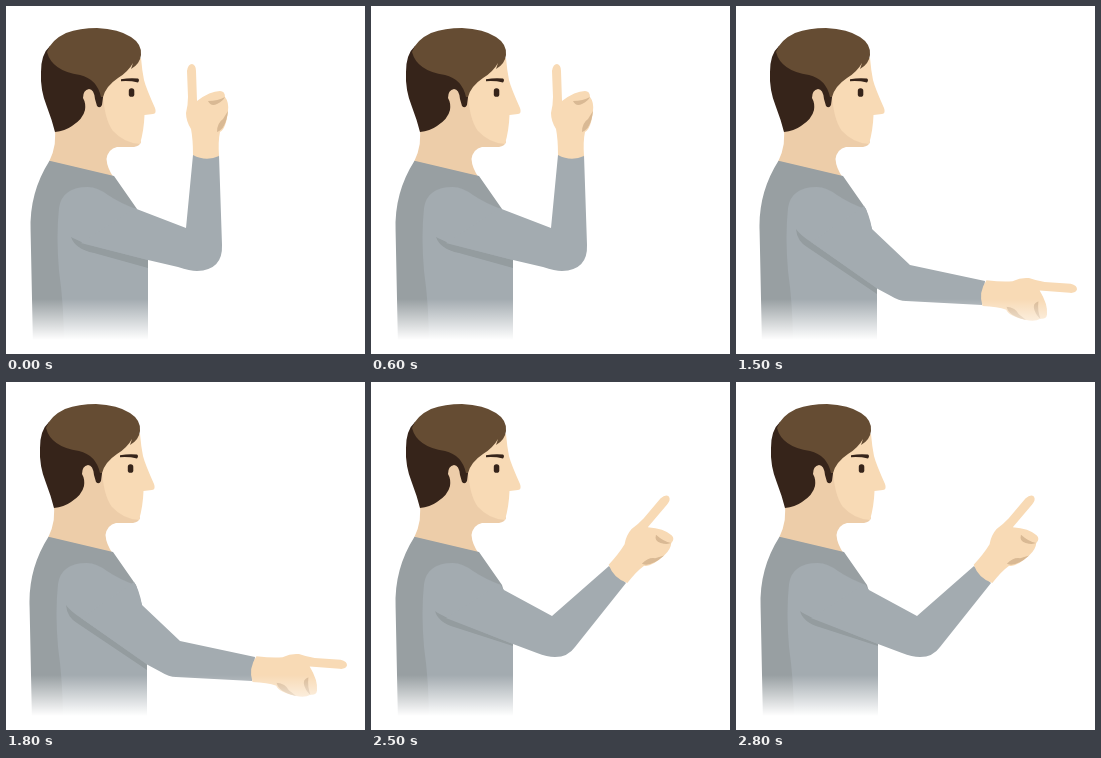
Animation of 359 by 348 pixels, one loop 3000 ms. Source, as an HTML page:

```html
<!DOCTYPE html>
<html lang="en">
<head>
<meta charset="utf-8">
<title>Pointing man</title>
<style>
  html, body { margin: 0; width: 100%; height: 100%; overflow: hidden; background: #fff; }
  svg { display: block; width: 100%; height: 100%; }
  .hair { fill: #36241a; }
  .top { fill: #654c33; }
  .skin { fill: #edcda9; }
  .light { fill: #f8dab5; }
  .tan { fill: #d9b994; }
  .back { fill: #989fa2; }
  .shirt { fill: #a3abb0; }
  #shade { fill: #949c9f; }
</style>
</head>
<body>
<svg viewBox="0 0 359 348">
  <defs>
    <linearGradient id="mist" x1="0" y1="0" x2="0" y2="1">
      <stop offset="0" stop-color="#fff" stop-opacity="0"/>
      <stop offset="1" stop-color="#fff"/>
    </linearGradient>
  </defs>
  <g id="man">
    <!-- neck, face -->
    <path class="skin" d="M48 118Q52 138 43 156L108 172Q101 162 100.5 153Q102 143 111 141L128 141Q134 140 135 136L110 80H60Z"/>
    <path class="light" d="M97 86Q98 70 110 65L135 52Q136 64 138 74Q140 82 149 102Q151 107.5 147 108L138.5 109Q138 124 134 138Q118 137 107 125Q98 113 97 86Z"/>
    <!-- hair around the ear, fringe -->
    <path class="hair" d="M49 126Q46 114 41 101Q34 84 35 66Q35 48 44 40L95 72Q99 82 96 99Q94 103 91 100L89 93Q88 83 83 83Q77 84 77 92Q80 97 79 104Q77 113 66 120Q59 125 49 126Z"/>
    <path class="top" d="M41 46Q45 34 60 27Q74 22 91 22Q113 23 125 31Q136 38 135 49Q134 58 125 63L127 57Q122 66 112 72Q100 80 97 91L95 91Q91 73 74 69Q46 65 41 46Z"/>
    <!-- brow, eye -->
    <path class="hair" d="M115 73.2Q124 71.5 132 72.5Q134 74 132 76.5Q124 74.5 115 75.2Z"/>
    <rect class="hair" x="122.8" y="82.2" width="5.5" height="8.6" rx="2.6"/>
    <!-- sweater -->
    <path class="back" d="M43.5 154.7L108 170L131 203L142 240V340H27L24.6 225Q23 187 43.5 154.7Z"/>
    <path class="shirt" d="M58 340Q58 300 53 265Q50 230 53 202Q56 181 82 181Q91 181 102 189Q114 197 130 203L142 240V340Z"/>
    <path id="shade"/>
  </g>
  <path id="arm" class="shirt"/>
  <g id="hand">
    <!-- origin at the wrist, finger upwards -->
    <path class="light" d="M-13 -2Q-13 -18 -15 -28Q-20 -36 -20 -44Q-18 -52 -18 -60L-19 -86Q-18 -93 -14 -93Q-10 -92 -10 -86L-9 -56Q4 -66 14 -66Q19 -66 19 -60Q23 -55 22 -46Q20 -28 14 -25Q12 -16 13 -1Q0 5 -13 -2Z"/>
    <path class="tan" d="M2 -56Q12 -56 19 -60Q17 -56 11 -53Q5 -50 2 -56ZM22 -46Q20 -28 11 -25Q11 -34 17 -38Z"/>
  </g>
  <rect y="293" width="359" height="41" fill="url(#mist)"/>
  <rect y="333.5" width="359" height="15" fill="#fff"/>
</svg>
<script>
  const el = id => document.getElementById(id);
  const poses = [
    { arm: "M128 202L180 222L187 149L213 149L216 239Q217 264 191 265Q184 265 172 261L142 254L75 237Z",
      shade: "M65 231Q69 233 80 238L142 254V262L88 247Q69 243 65 231Z",
      hand: [200, 151, 0], dx: 0 },
    { arm: "M128 200Q135 208 138 233L168 269Q171 274 175 277L233 319L218 338L155 305L142 297L75 237Z",
      shade: "M59 220Q64 227 75 237L142 297V302L70 241Q59 232 59 220Z",
      hand: [226, 329, 122], dx: -.4 },
    { arm: "M128 200Q133 207 136 223L174 259L249 275L246 299L170 295Q163 295 155 290L141 282.5L75 236Z",
      shade: "M61 223Q65 229 76 236L142 282V288L72 241Q62 235 61 223Z",
      hand: [247, 287, 96.5], dx: -1 },
    { arm: "M128 200Q133 207 135 215L179 246L254 227L261 251L185 285Q178 289 171 285L142 273L75 236Z",
      shade: "M63 227Q67 231 78 237L142 272V279L78 243Q65 238 63 227Z",
      hand: [255.5, 239, 70], dx: 0 },
    { arm: "M128 202L133 208L181 234L238 184L255 201L204 265Q197 275 184 275Q176 275 166 271L142 262L75 236Z",
      shade: "M64 229Q68 232 79 237L142 262V264L83 245Q67 240 64 229Z",
      hand: [246, 193, 42], dx: 0 }
  ];
  let shown = -1;

  function show(pose) {
    const [x, y, turn] = pose.hand;
    el("arm").setAttribute("d", pose.arm);
    el("shade").setAttribute("d", pose.shade);
    el("hand").setAttribute("transform", `translate(${x} ${y}) rotate(${turn})`);
    el("man").setAttribute("transform", `translate(${pose.dx} 0)`);
  }

  // The first pose holds for two steps, the others for one.
  function tick() {
    const step = Math.floor(performance.now() % 3000 / 500);
    const next = Math.max(0, step - 1);
    if (next !== shown) show(poses[shown = next]);
    requestAnimationFrame(tick);
  }
  tick();
</script>
</body>
</html>
```
